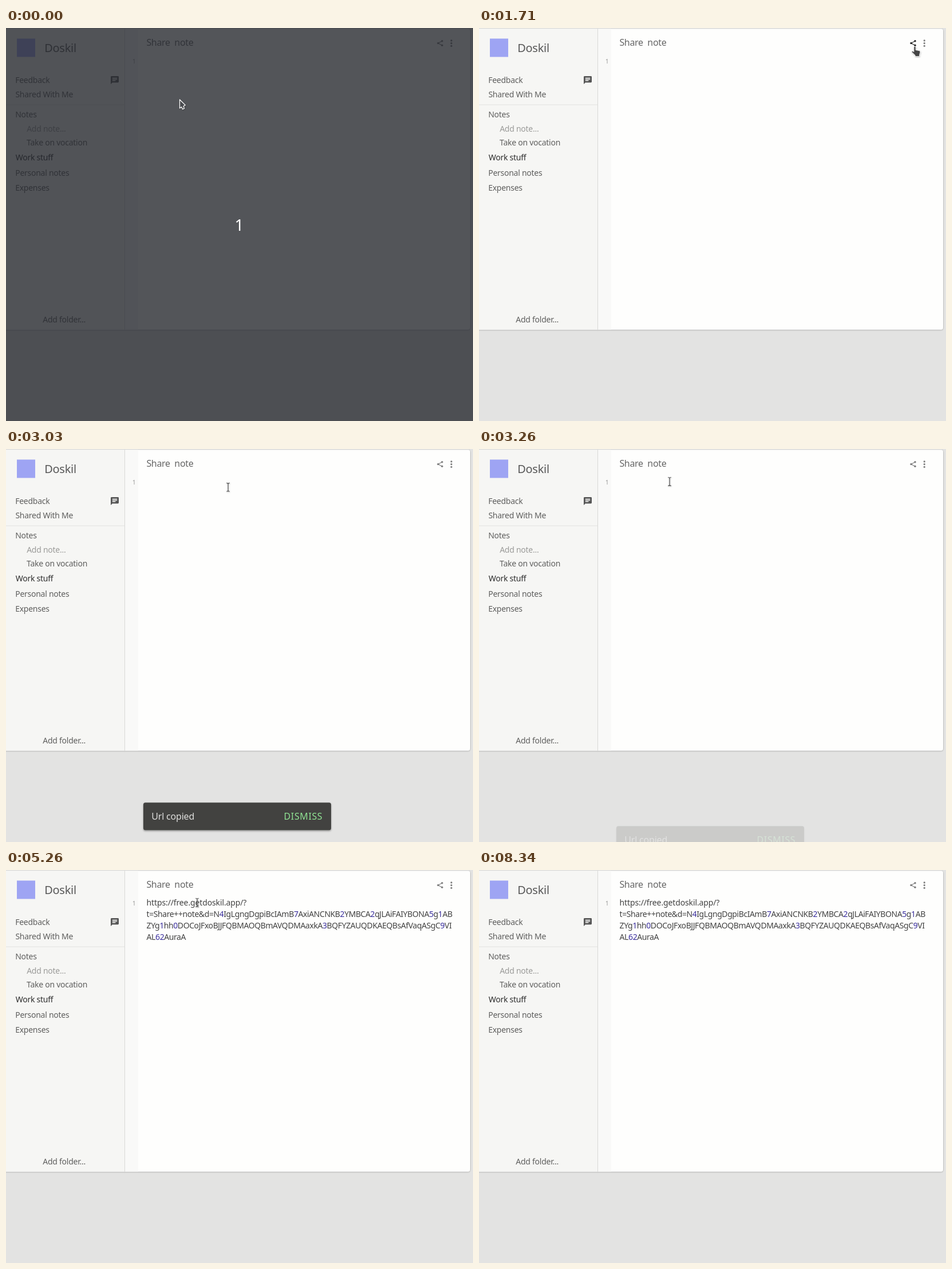
Write an HTML page that moves like this. It is 816 px wide and 686 px high and loops after 8.37 s.

```html
<!DOCTYPE html>
<html lang="en">
<head>
<meta charset="utf-8">
<title>Share note</title>
<style>
html, body { margin: 0; width: 100%; height: 100%; overflow: hidden; background: #e3e3e2; }
svg { display: block; width: 816px; height: 686px; }
text { font: 14px "Noto Sans", sans-serif; letter-spacing: -.26px; fill: #5f5f5e; white-space: pre; }
.brand { font-size: 20px; fill: #585858; }
.title { font-size: 16px; letter-spacing: -.33px; fill: #666; }
.muted { fill: #9b9b99; }
.active { fill: #2d2d2d; }
.line-no { font-size: 10.5px; fill: #999; }
.code text { letter-spacing: -.42px; fill: #424242; }
.code text:first-child { letter-spacing: -.13px; }
.code .num { fill: #3a2f9e; }
.snack text { font-size: 16px; letter-spacing: -.2px; fill: #dededc; }
.snack .action { fill: #90e494; letter-spacing: .6px; }
.count { font-size: 28px; fill: #fff; text-anchor: middle; }
</style>
</head>
<body>
<svg viewBox="0 0 816 686">
  <defs>
    <filter id="cardShadow" x="-5%" y="-5%" width="110%" height="110%">
      <feDropShadow dx="0" dy="0.5" stdDeviation="1.3" flood-color="#000" flood-opacity=".36"/>
    </filter>
    <filter id="snackShadow" x="-5%" y="-20%" width="110%" height="150%">
      <feDropShadow dx="0" dy="1.5" stdDeviation="1.5" flood-color="#000" flood-opacity=".4"/>
    </filter>
    <filter id="pointerShadow" x="-50%" y="-50%" width="200%" height="200%">
      <feDropShadow dx="0.5" dy="1" stdDeviation="0.8" flood-color="#000" flood-opacity=".3"/>
    </filter>
  </defs>
  <rect width="816" height="686" fill="#e3e3e2"/>

  <rect x="-10" y="1.5" width="821" height="525" rx="4" fill="#fefefd" filter="url(#cardShadow)"/>
  <rect y="1.5" width="207" height="525" fill="#f6f6f4"/>
  <rect x="208" y="1.5" width="23" height="525" fill="#f9f9f8"/>
  <rect x="207" y="1.5" width="1" height="525" fill="#d8d8d7"/>
  <rect y="133.5" width="207" height="1" fill="#e3e3e2"/>

  <rect x="19" y="18.5" width="32" height="32" fill="#9ea4f3"/>
  <text class="brand" x="67.2" y="42">Doskil</text>
  <g id="menu"></g>
  <path transform="translate(181.6 82.6) scale(.7)" fill="#555" d="M20 2H4c-1.1 0-2 .9-2 2v18l4-4h14c1.1 0 2-.9 2-2V4c0-1.1-.9-2-2-2zM6 9h12v2H6zm8 5H6v-2h8zm4-6H6V6h12z"/>

  <text class="title" x="245.4" y="31">Share  note</text>
  <text class="line-no" x="220.8" y="62">1</text>
  <g id="share">
    <path d="M762 22.8L755 26.5L762 30.2" fill="none" stroke-width="1.1"/>
    <g stroke="none">
      <circle cx="755" cy="26.5" r="1.7"/>
      <circle cx="762" cy="22.8" r="1.7"/>
      <circle cx="762" cy="30.2" r="1.7"/>
    </g>
  </g>
  <g fill="#7d7d7d">
    <circle cx="778.2" cy="21.9" r="1.6"/>
    <circle cx="778.2" cy="26.6" r="1.6"/>
    <circle cx="778.2" cy="31.3" r="1.6"/>
  </g>

  <g id="code" class="code"></g>
  <rect id="caret" width="1.2" height="19" fill="#333"/>

  <g id="snack" class="snack">
    <rect x="240" y="617.2" width="328" height="48" rx="3.5" fill="#424340" filter="url(#snackShadow)"/>
    <text x="254.3" y="647">Url copied</text>
    <text class="action" x="485.6" y="647">DISMISS</text>
  </g>

  <g id="overlay">
    <rect width="816" height="686" fill="rgb(35,38,44)" opacity=".78"/>
    <text class="count" x="407.5" y="353.5">1</text>
  </g>

  <g id="pointer" filter="url(#pointerShadow)" stroke="#fff" stroke-width=".8" stroke-linejoin="round">
    <path id="arrow" d="M0 0V15L3.2 12.8L5 16.8L8 15.4L6.6 11.6L9.8 9.6Z"/>
    <path id="hand" fill="#454545" d="M-1.6 1.6a1.6 1.6 0 0 1 3.2 0V6.4L7.8 7.6Q9.6 8.2 9.4 10.4L8.2 14.4V17.6H0.6V15.6L-5.4 9.8Q-5.6 7.8 -3.6 8.4L-1.6 9.6Z"/>
    <path id="beam" fill="none" stroke="#444" stroke-width="1.1" d="M-2.7 -7.3Q-.3 -7.3 0 -6.2Q.3 -7.3 2.7 -7.3M0 -6.5V6.5M-2.7 7.3Q-.3 7.3 0 6.2Q.3 7.3 2.7 7.3"/>
  </g>
</svg>
<script>
const LOOP = 8370;
const $ = id => document.getElementById(id);
const el = Object.fromEntries(
  ["share", "code", "caret", "snack", "overlay", "pointer", "arrow", "hand", "beam"].map(id => [id, $(id)]));

const menu = [
  ["Feedback", 16.2, 96], ["Shared With Me", 16.4, 121], ["Notes", 16.2, 156],
  ["Add note...", 36.2, 181, "muted"], ["Take on vocation", 36, 205.2],
  ["Work stuff", 16.8, 231.3, "active"], ["Personal notes", 16.2, 258],
  ["Expenses", 16.2, 284], ["Add folder...", 64.3, 514]
];
$("menu").innerHTML = menu.map(([label, x, y, cls = ""]) =>
  `<text x="${x}" y="${y}" class="${cls}">${label}</text>`).join("");

const lines = [
  "https://free.getdoskil.app/?",
  "t=Share++note&d=N4IgLgngDgpiBcIAmB7AxiANCNKB2YMBCA2qJLAiFAIYBONA5g1AB",
  "ZYg1hh0DOCoJFxoBJJFQBMAOQBmAVQDMAaxkA3BQFYZAUQDKAEQBsAfVaqASgC9VI",
  "AL62AuraA"
];
el.code.innerHTML = lines.map((line, i) => {
  const marked = line.replace("&", "&amp;").replace(/\d+/g, '<tspan class="num">$&</tspan>');
  return `<text x="245.6" y="${62 + 20 * i}">${marked}</text>`;
}).join("");

// Pointer hotspot: [time, x, y]
const path = [
  [0, 303.5, 125], [600, 303.5, 125], [1400, 762.5, 32], [1660, 762.5, 32],
  [1710, 761.5, 32], [1940, 761.5, 32], [1990, 760.5, 32], [2290, 760.5, 32],
  [2740, 440, 76], [2830, 440, 76], [3240, 333, 56.8], [3600, 333, 56.8],
  [3630, 334, 56.8], [7260, 334, 56.8], [7430, 160, 46], [LOOP, 160, 46]
];
const caretOn = [[3460, 4060], [4660, 5260], [5860, 6460], [7060, 7660], [8260, 8340]];

const clamp = v => Math.max(0, Math.min(1, v));
const part = (t, from, to) => clamp((t - from) / (to - from));
const smooth = p => p * p * (3 - 2 * p);
const show = (node, on) => { node.style.display = on ? "" : "none"; };

function pointerAt(t) {
  const i = path.findIndex(k => k[0] > t);
  const [t0, x0, y0] = path[i - 1], [t1, x1, y1] = path[i];
  const p = smooth(part(t, t0, t1));
  return [x0 + (x1 - x0) * p, y0 + (y1 - y0) * p];
}

function drawPointer(t) {
  const [x, y] = pointerAt(t);
  const dimmed = t < 290;
  const onShare = x > 751 && y < 37;
  const onLine = x > 236 && y > 47 && y < 68;
  show(el.pointer, t < 7490);
  show(el.hand, onShare);
  show(el.beam, onLine);
  show(el.arrow, !onShare && !onLine);
  el.pointer.setAttribute("transform", `translate(${x} ${y})`);
  el.arrow.setAttribute("fill", dimmed ? "#4a4c50" : "#454545");
  el.arrow.setAttribute("stroke-width", dimmed ? 1.2 : .8);
  const tint = onShare ? "#222" : "#7d7d7d";
  el.share.setAttribute("fill", tint);
  el.share.setAttribute("stroke", tint);
}

function drawSnack(t) {
  const enter = part(t, 2190, 2300), leave = part(t, 3110, 3287);
  const scale = .8 + .2 * enter;
  show(el.snack, enter > 0 && leave < 1);
  el.snack.setAttribute("opacity", clamp(enter * 1.56) * (1 - leave));
  el.snack.setAttribute("transform",
    `translate(404 ${641.2 + 48 * leave}) scale(${scale}) translate(-404 -641.2)`);
}

function draw(t) {
  const pasted = t >= 4490;
  show(el.overlay, t < 290);
  show(el.code, pasted);
  show(el.caret, caretOn.some(([from, to]) => t >= from && t < to));
  el.caret.setAttribute("x", pasted ? 312.8 : 245);
  el.caret.setAttribute("y", pasted ? 108 : 48);
  drawSnack(t);
  drawPointer(t);
}

const start = performance.now();
function tick() {
  draw((performance.now() - start) % LOOP);
  requestAnimationFrame(tick);
}
draw(0);
requestAnimationFrame(tick);
</script>
</body>
</html>
```
